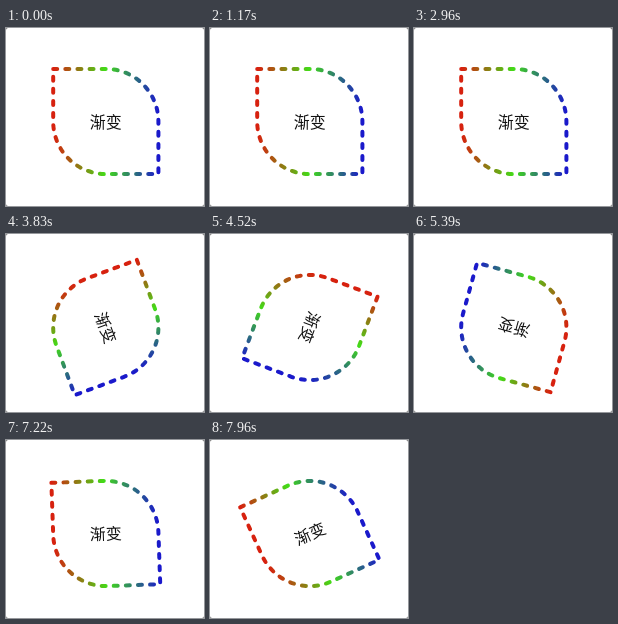
Animation of 198 by 178 pixels, one loop 8000 ms. Source, as an HTML page with a canvas:

```html
<!DOCTYPE html>
<html lang="zh-CN">
<head>
<meta charset="utf-8">
<title>渐变</title>
<style>
  html, body { margin: 0; width: 100%; height: 100%; overflow: hidden; background: #fff; }
  canvas { display: block; width: 198px; height: 178px; }
</style>
</head>
<body>
<canvas id="stage" width="198" height="178"></canvas>
<script>
const ctx = document.getElementById('stage').getContext('2d');
const W = 198, H = 178;
const LOOP = 8000, FPS = 23;
const CX = 99.8, CY = 93.5, HALF = 52.6;
const DASHES = 31, DASH = 4;

// Each full counter-clockwise turn: [start, duration] in ms
const TURNS = [
  [1390, 1150], [3040, 1100], [4141, 600], [5060, 700],
  [5784, 700], [7190, 680], [7870, 566]
];

const clamp = v => Math.max(0, Math.min(1, v));
const ease = u => u * u * (3 - 2 * u);

function angleAt(ms) {
  const turns = TURNS.reduce((sum, [start, dur]) => sum + ease(clamp((ms - start) / dur)), 0);
  return -turns * 2 * Math.PI;
}

// Leaf: square corners top left and bottom right, the other two fully round
function makeLeaf(r) {
  const p = new Path2D();
  p.moveTo(-r, -r);
  p.lineTo(0, -r);
  p.arc(0, 0, r, -Math.PI / 2, 0);
  p.lineTo(r, r);
  p.lineTo(0, r);
  p.arc(0, 0, r, Math.PI / 2, Math.PI);
  p.closePath();
  return p;
}

const leaf = makeLeaf(HALF);
const period = HALF * (4 + Math.PI) / DASHES;

const rainbow = ctx.createLinearGradient(-HALF, 0, HALF, 0);
rainbow.addColorStop(0, '#d8200f');
rainbow.addColorStop(0.5, '#42dc18');
rainbow.addColorStop(1, '#1a18cc');

function drawCard() {
  ctx.fillStyle = '#777';
  ctx.fillRect(0, 0, W, H);
  ctx.fillStyle = '#fff';
  ctx.beginPath();
  ctx.roundRect(0, 0, W, H, 2.5);
  ctx.fill();
}

function draw(ms) {
  drawCard();
  ctx.save();
  ctx.translate(CX, CY);
  ctx.rotate(angleAt(ms));

  ctx.strokeStyle = rainbow;
  ctx.lineWidth = 4;
  ctx.lineCap = 'round';
  ctx.setLineDash([DASH, period - DASH]);
  ctx.stroke(leaf);

  ctx.fillStyle = '#111';
  ctx.font = '16px "Noto Sans CJK SC", "Noto Sans CJK", sans-serif';
  ctx.textAlign = 'center';
  ctx.fillText('渐变', 0, 6.3);
  ctx.restore();
}

const origin = performance.now();

function tick() {
  const t = Math.max(0, performance.now() - origin) % LOOP;
  const step = Math.floor((t + 5) * FPS / 1000);
  draw(Math.round(step * 100 / FPS) * 10);
  requestAnimationFrame(tick);
}
tick();
</script>
</body>
</html>
```
